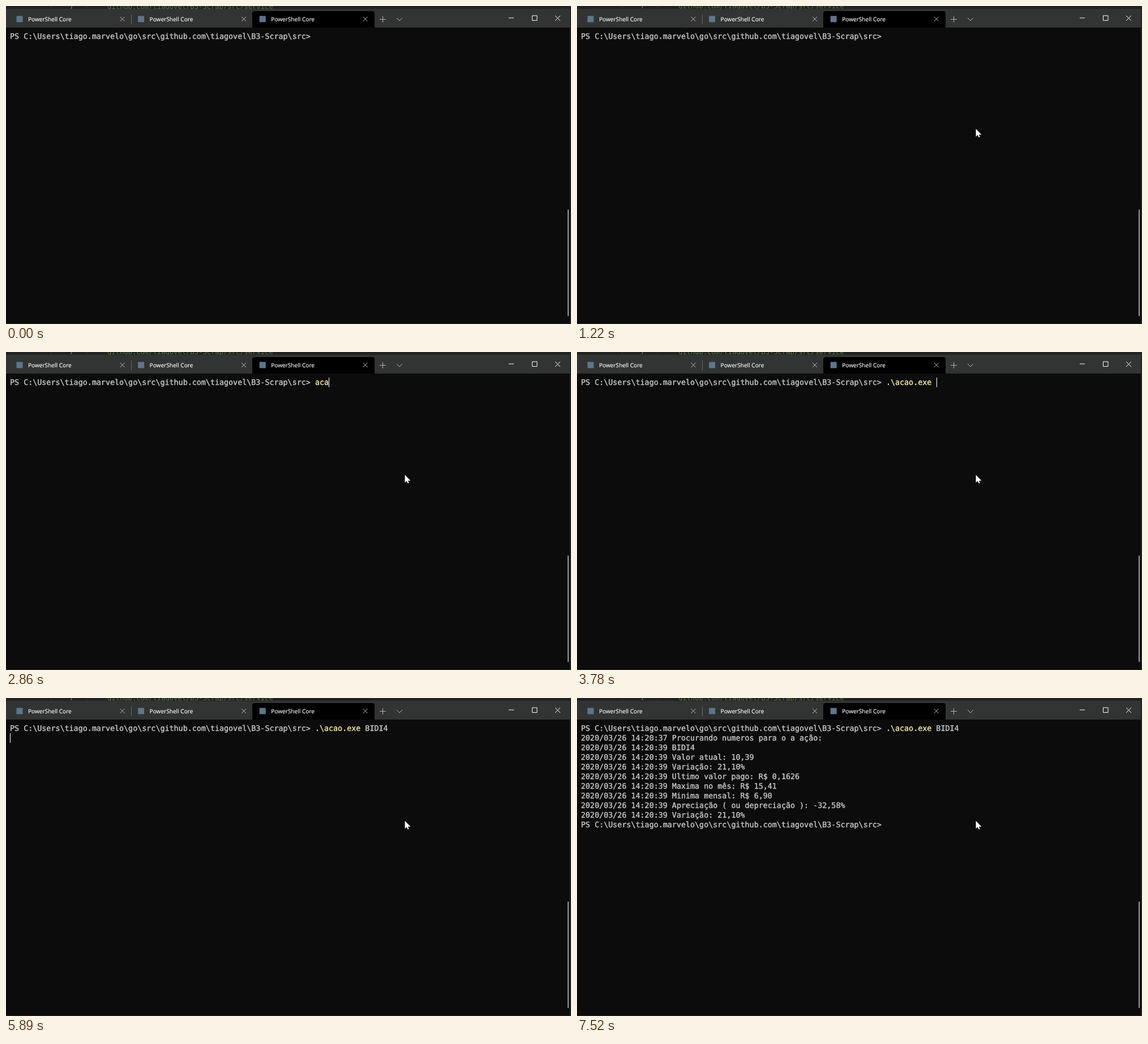
Write an HTML page that moves like this. It is 998 px wide and 561 px high and loops after 8 s.

```html
<!DOCTYPE html>
<html lang="pt">
<head>
<meta charset="utf-8">
<title>Terminal</title>
<style>
html, body { margin: 0; width: 100%; height: 100%; overflow: hidden; background: #0c0c0c; }
#stage { position: relative; width: 998px; height: 561px; overflow: hidden; text-rendering: geometricPrecision; }
#stage > * { position: absolute; }
#editor { left: 0; top: 0; width: 998px; height: 570px; background: #222322; }
#editor span { position: absolute; font: 12.17px/14px "DejaVu Sans Mono", monospace; white-space: pre; }
#window { left: 0; top: 5px; width: 996px; height: 555px; background: #0c0c0c; }
#chrome { left: 0; top: 0; }
#chrome text { font: 10.1px "Open Sans", sans-serif; fill: #fff; stroke: #fff; stroke-width: .15px; }
#screen { left: 7px; top: 46px; margin: 0; font: 13.371px/17px "DejaVu Sans Mono", monospace; color: #ccc; font-variant-ligatures: none; -webkit-text-stroke: .35px; }
#screen b { font-weight: normal; color: #f9f1a5; }
#caret { width: 1px; height: 17px; background: #fff; }
#mouse { left: 0; top: 0; overflow: visible; }
</style>
</head>
<body>
<div id="stage">
  <div id="editor">
    <span style="left:57px;top:-12px;color:#8f7d20">●</span>
    <span style="left:112px;top:-6px;color:#858585">7</span>
    <span style="left:179px;top:-6px;color:#58743d">github.com/tiagovel/B3-Scrap/src/service</span>
  </div>
  <div id="window"></div>
  <svg id="chrome" width="998" height="561" fill="none">
    <path d="M0 5H996V38H0Z" fill="#323433"/>
    <path d="M435 38V13q0-4 4-4H647q4 0 4 4V38Z" fill="#000"/>
    <path d="M221.5 15V32" stroke="#666"/>
    <g id="tabs"></g>
    <path d="M660 23.5H671M665.5 18V29M690 21L695 26L700 21" stroke="#b4b4b4"/>
    <path d="M888 21H897M929.5 17H938V25.5H929.5ZM970 17L979 26M979 17L970 26" stroke="#fff"/>
    <path d="M79.5 0V5M142.5 0V5" stroke="#333"/>
    <path d="M993 360V546" stroke="#9c9c9c" stroke-width="2" stroke-linecap="round"/>
    <path d="M996.5 5V561M0 560.5H998" stroke="#222322"/>
  </svg>
  <pre id="screen"></pre>
  <div id="caret"></div>
  <svg id="mouse" width="12" height="18"><path d="M0 0V13.6L3.1 10.8L5.1 15L7.2 14.1L5.4 10.2H10Z" fill="#fff"/></svg>
</div>
<script>
const LOOP = 8000, CELL = 8.05, ROW = 17;
const $ = id => document.getElementById(id);
const prompt = 'PS C:\\Users\\tiago.marvelo\\go\\src\\github.com\\tiagovel\\B3-Scrap\\src> ';
const exe = '.\\acao.exe';
const searching = '2020/03/26 14:20:37 Procurando numeros para o a ação:';
const results = [
  'BIDI4', 'Valor atual: 10,39', 'Variação: 21,10%', 'Ultimo valor pago: R$ 0,1626',
  'Maxima no mês: R$ 15,41', 'Minima mensal: R$ 6,90',
  'Apreciação ( ou depreciação ): -32,58%', 'Variação: 21,10%'
].map(line => '2020/03/26 14:20:39 ' + line);

// time, typed command, caret visible, caret row, output lines
const steps = [
  [0, '', 0], [670, '', 1], [1220, '', 0], [1770, '', 1], [2320, '', 0],
  [2630, 'a', 1], [2780, 'ac', 1], [2860, 'aca', 1],
  [3090, exe, 1], [3550, exe, 0], [3700, exe, 1],
  [3780, exe + ' ', 1], [4240, exe + ' ', 0],
  [4410, exe + ' B', 1], [4560, exe + ' BI', 1], [4640, exe + ' BID', 1],
  [4790, exe + ' BIDI', 1], [5170, exe + ' BIDI4', 1], [5720, exe + ' BIDI4', 0],
  [5890, exe + ' BIDI4', 1, 1],
  [6270, exe + ' BIDI4', 1, 2, [searching]],
  [6420, exe + ' BIDI4', 0, 2, [searching]],
  [6970, exe + ' BIDI4', 1, 2, [searching]],
  [7520, exe + ' BIDI4', 0, 10, [searching, ...results, prompt]]
];

$('tabs').innerHTML = [0, 214.6, 429.2].map(x => `<g transform="translate(${x})">
  <rect x="18.5" y="17.5" width="11" height="11" fill="#5c768c"/>
  <text x="39" y="27.4">PowerShell Core</text>
  <path d="M201.5 19L209.5 27M209.5 19L201.5 27" stroke="#b8b8b8"/></g>`).join('');

const escape = text => text.replace(/>/g, '&gt;');
let shown = null;

function drawStep(step) {
  if (step === shown) return;
  shown = step;
  const [, typed, visible, row = 0, output = []] = step;
  const [command, ...args] = typed.split(' ');
  const first = escape(prompt) + `<b>${command}</b>` + args.map(arg => ' ' + arg).join('');
  $('screen').innerHTML = [first, ...output.map(escape)].join('\n');
  const column = row ? 0 : prompt.length + typed.length;
  $('caret').style.left = Math.floor(7.15 + column * CELL) + 'px';
  $('caret').style.top = 45 + row * ROW + 'px';
  $('caret').style.visibility = visible ? 'visible' : 'hidden';
}

function drawMouse(t) {
  const progress = Math.min(1, Math.floor((t - 70) / 75.5) / 9);
  const left = (1 - progress) ** 2;
  const settle = t < 1070 ? 0.5 : 0;
  $('mouse').style.visibility = t < 70 ? 'hidden' : 'visible';
  $('mouse').style.transform = `translate(${704.6 + 284 * left + settle}px, ${216.8 + 334 * left + settle}px)`;
}

function frame(now) {
  const t = now % LOOP;
  drawStep(steps.findLast(step => step[0] <= t));
  drawMouse(t);
  $('editor').style.top = t < 70 ? '0' : '-1px';
  requestAnimationFrame(() => frame(performance.now() - start));
}
const start = performance.now();
frame(0);
</script>
</body>
</html>
```
